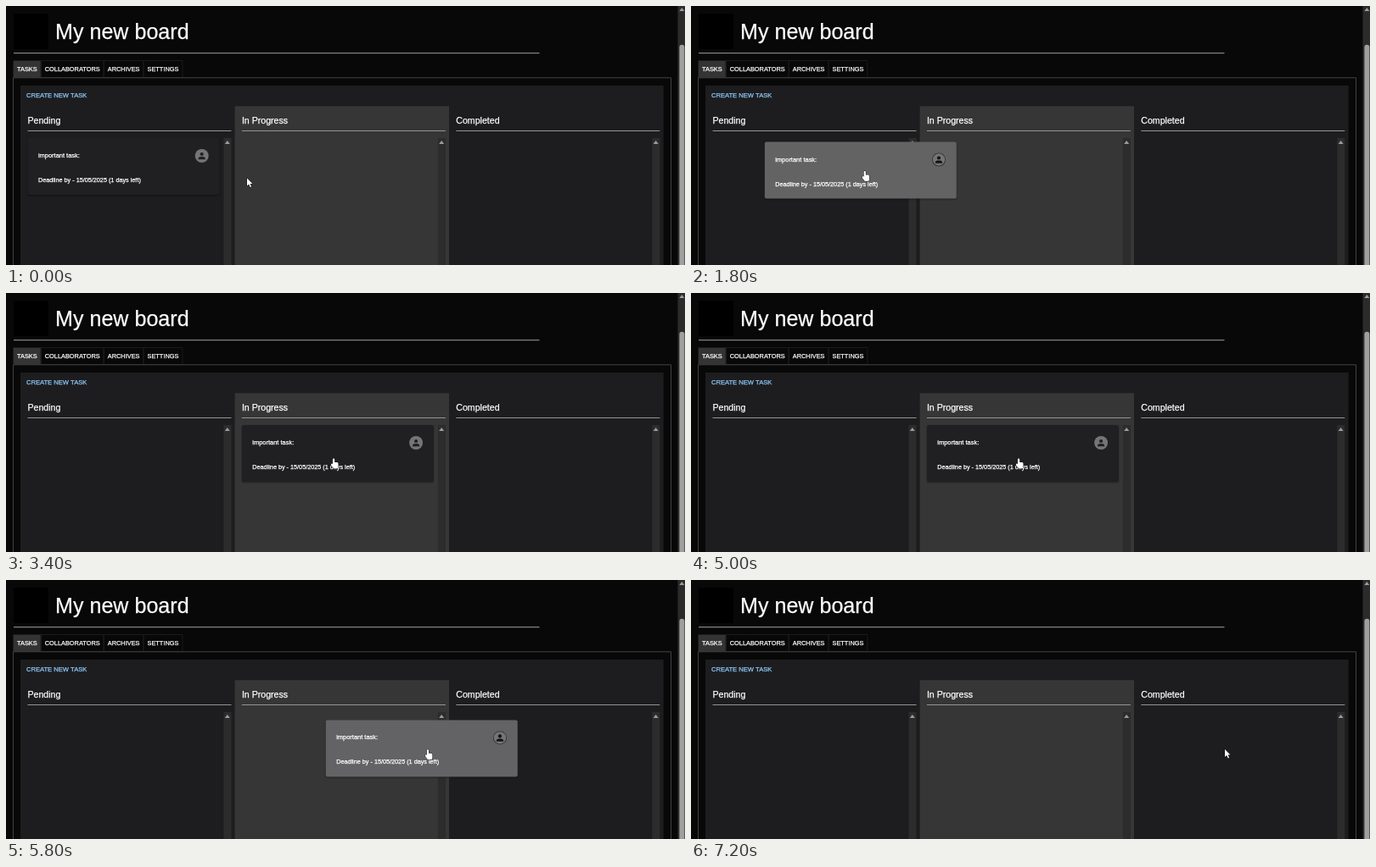
Animation, 800 px wide and 306 px high, one loop 8000 ms. Source, as an HTML page with a canvas:

```html
<!DOCTYPE html>
<html lang="en">
<head>
<meta charset="utf-8">
<title>Task board</title>
<style>
html, body { margin: 0; width: 100%; height: 100%; overflow: hidden; background: #080808; }
canvas { display: block; }
</style>
</head>
<body>
<canvas id="stage" width="800" height="306"></canvas>
<script>
const ctx = document.getElementById('stage').getContext('2d');
const LOOP = 8000, STEP = 100, DRAG_LAG = 27;
const CARD = { w: 226, h: 67 };
const columnX = i => 25.5 + 252.4 * i;
const slot = i => [columnX(i), 156];

const linear = k => k;
const smooth = k => k * k * k * (k * (6 * k - 15) + 10);

const START = [284, 203];
const MOVES = [
  { from: 100, until: 700, to: [197, 194], curve: smooth },
  { from: 1700, until: 2300, to: [385, 194.5], curve: smooth },
  { from: 5310, until: 6300, to: [609, 204], curve: linear },
  { from: 6300, until: 6700, to: [629, 199.5], curve: smooth }
];

function pointerAt(t) {
  return MOVES.reduce((pos, { from, until, to, curve }) => {
    const k = curve(Math.min(1, Math.max(0, (t - from) / (until - from))));
    return pos.map((p, i) => p + (to[i] - p) * k);
  }, START);
}

// cubic-bezier(.4, 0, .2, 1)
function rippleEase(x) {
  if (x >= 1) return 1;
  let lo = 0, hi = 1;
  for (let i = 0; i < 20; i++) {
    const s = (lo + hi) / 2, r = 1 - s;
    if (1.2 * r * r * s + 0.6 * r * s * s + s * s * s < x) lo = s; else hi = s;
  }
  return lo * lo * (3 - 2 * lo);
}

function rippleAt(age, x, y) {
  if (age <= 0) return null;
  const k = rippleEase(age / 550);
  const full = Math.hypot(Math.max(x, CARD.w - x) + 1, Math.max(y, CARD.h - y) + 1);
  return { x, y, r: full * k, alpha: 0.1 + 0.2 * k };
}

function rect(x, y, w, h, color) {
  ctx.fillStyle = color;
  ctx.fillRect(x, y, w, h);
}

function rounded(x, y, w, h, r, color) {
  ctx.beginPath();
  ctx.roundRect(x, y, w, h, r);
  ctx.fillStyle = color;
  ctx.fill();
}

function disc(x, y, r, color) {
  ctx.beginPath();
  ctx.arc(x, y, r, 0, Math.PI * 2);
  ctx.fillStyle = color;
  ctx.fill();
}

// A hairline stroke gives small text its slightly heavier weight.
function text(str, x, y, size, color = '#fff') {
  ctx.font = `${size}px "Liberation Sans", Arial, sans-serif`;
  ctx.fillStyle = ctx.strokeStyle = color;
  ctx.lineWidth = 0.25;
  ctx.fillText(str, x, y);
  ctx.strokeText(str, x, y);
  return ctx.measureText(str).width;
}

function upArrow(x, y) {
  ctx.beginPath();
  ctx.moveTo(x - 3, y + 2);
  ctx.lineTo(x, y - 2);
  ctx.lineTo(x + 3, y + 2);
  ctx.fillStyle = '#9c9c9c';
  ctx.fill();
}

function tabs(labels) {
  let x = 8.5;
  rect(x, 65, 33.5, 20, '#343434');
  for (const label of labels) {
    const width = text(label, x + 4.5, 77, 7.4) + 9;
    ctx.lineWidth = 1;
    ctx.strokeStyle = '#1b1b1b';
    ctx.strokeRect(x, 64.5, width, 20);
    x += width;
  }
}

function column(title, i) {
  const x = columnX(i);
  text(title, x, 138.7, 10.6);
  rect(x, 147, 240, 1, '#949494');
  rect(x + 231, 156, 9, 150, '#2c2c2c');
  upArrow(x + 235.3, 161);
}

function board() {
  rect(0, 0, 800, 306, '#080808');
  rect(9, 9, 41, 42, '#000');
  text('My new board', 58, 39, 25.1);
  rect(9, 55.2, 619.5, 1, '#a0a0a0');

  tabs(['TASKS', 'COLLABORATORS', 'ARCHIVES', 'SETTINGS']);
  ctx.strokeStyle = '#424242';
  ctx.strokeRect(8.5, 84.8, 775, 240);

  rect(17, 94, 757.7, 212, '#1d1d1f');
  text('CREATE NEW TASK', 24, 108, 7.58, '#90caf9');
  rect(269.6, 118.3, 252.4, 188, '#363636');
  ['Pending', 'In Progress', 'Completed'].forEach(column);

  rect(791.5, 0, 9, 306, '#2b2b2b');
  upArrow(796.3, 4);
  rounded(793.4, 45.8, 6, 280, 3, '#9f9f9f');
}

function avatar(x, y, lifted) {
  const ink = lifted ? '#141414' : '#202022';
  disc(x, y, 8, lifted ? '#303030' : '#757575');
  if (lifted) disc(x, y, 7.2, '#747474');
  disc(x, y - 2, 2.1, ink);
  rounded(x - 4.2, y + 1, 8.4, 3.2, [4, 4, 0, 0], ink);
}

function card([x, y], { ripple = null, lifted = false } = {}) {
  ctx.save();
  ctx.shadowColor = 'rgba(0,0,0,.4)';
  ctx.shadowBlur = 2;
  ctx.shadowOffsetY = 1;
  rounded(x, y, CARD.w, CARD.h, 2, '#202022');
  ctx.restore();

  if (ripple) {
    ctx.save();
    ctx.clip();
    disc(x + ripple.x, y + ripple.y, ripple.r, `rgba(255,255,255,${ripple.alpha})`);
    ctx.restore();
  }
  text('important task:', x + 12.4, y + 23, 7.48);
  text('Deadline by - 15/05/2025 (1 days left)', x + 12.4, y + 52, 7.25);
  avatar(x + 205.2, y + 21, lifted);
}

function outlined(shape) {
  ctx.lineJoin = 'round';
  ctx.lineWidth = 1;
  ctx.strokeStyle = '#111';
  ctx.stroke(shape);
  ctx.fillStyle = '#fff';
  ctx.fill(shape);
}

function arrowCursor(x, y) {
  y += 0.4;
  const shape = new Path2D(`M${x} ${y}v9.2l2.1-2 1.6 3.4 1.4-.6-1.5-3.3 2.8-.2z`);
  outlined(shape);
}

function handCursor(x, y) {
  const shape = new Path2D();
  shape.roundRect(x - 0.1, y + 1, 2.3, 8, 1.1);
  shape.roundRect(x - 0.1, y + 5.6, 6.6, 7.4, [1, 1.5, 2.5, 2.5]);
  shape.ellipse(x - 0.3, y + 9.3, 1.2, 2.6, -0.6, 0, Math.PI * 2);
  outlined(shape);
}

function draw(t) {
  const [px, py] = pointerAt(t);
  const first = rippleAt(t - 1300, 172, 38.5);
  const second = rippleAt(t - 4990, 107, 38.5);
  const [gx, gy] = pointerAt(t - DRAG_LAG);
  const held = [gx - CARD.w / 2, gy - CARD.h / 2];
  let arrow = false;

  board();
  if (t < 1700) {
    card(slot(0), { ripple: first });
    arrow = px > 251;
  } else if (t < 2700) {
    card(held, { ripple: first, lifted: true });
  } else if (t < 3400) {
    if (t < 2800) card(slot(0));
    arrow = true;
  } else if (t < 5400) {
    card(slot(1), { ripple: second });
  } else if (t < 7200) {
    // The lifted card first hangs from the press point, then centres on the pointer.
    card(t < 5500 ? [386, 194.3] : held, { ripple: second, lifted: true });
  } else {
    arrow = true;
  }
  (arrow ? arrowCursor : handCursor)(px, py);
}

function tick() {
  draw(Math.floor(performance.now() % LOOP / STEP) * STEP);
  requestAnimationFrame(tick);
}
tick();
</script>
</body>
</html>
```
